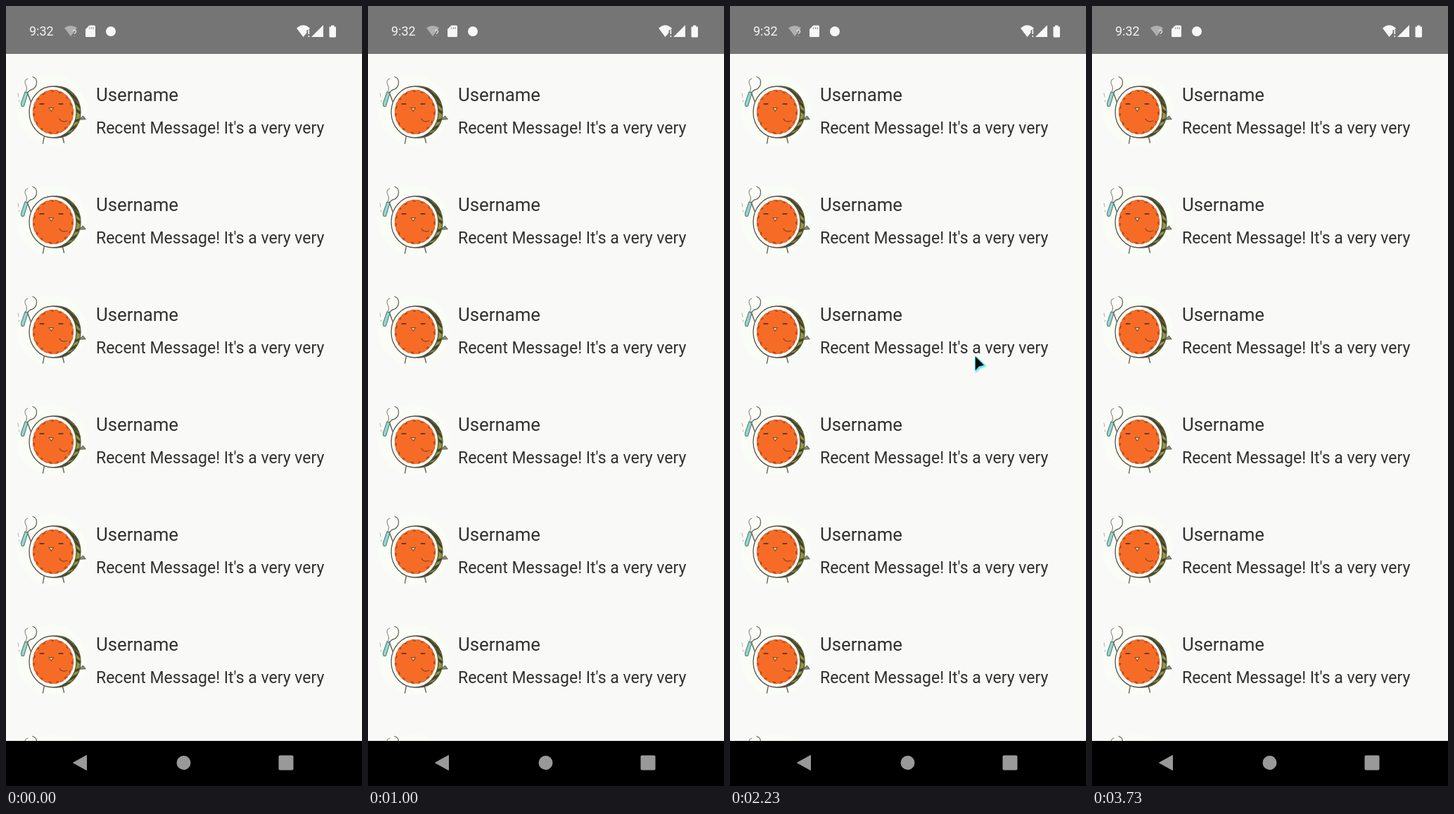
An HTML page that plays this animation: 506x1107 px, repeating every 3.76 s.

```html
<!DOCTYPE html>
<html lang="en">
<head>
<meta charset="utf-8">
<title>Message list</title>
<style>
  html, body { margin: 0; width: 100%; height: 100%; overflow: hidden; background: #f9faf8; }
  svg { display: block; width: 506px; height: 1107px; }
  text { font-family: Roboto, sans-serif; font-weight: 400; fill: #303030; }
  .name { font-size: 25.8px; }
  .msg { font-size: 23px; }
  .clock { font-size: 18px; fill: #f4f4f4; }
</style>
</head>
<body>
<svg viewBox="0 0 506 1107">
  <defs>
    <filter id="glow" x="-50%" y="-50%" width="200%" height="200%">
      <feGaussianBlur stdDeviation="1.3"/>
    </filter>
    <clipPath id="rind"><ellipse cx="72" cy="150.500" rx="34" ry="36.500"/></clipPath>
    <g id="melon" fill="none" stroke="#56554a" stroke-width="1.3" stroke-linecap="round" stroke-linejoin="round">
      <circle cx="65" cy="148" r="50" fill="#f9fdf5" stroke="none"/>
      <!-- limbs -->
      <path d="M54.5 184L52.5 195M80 184L82.5 194M36 138L30 122"/>
      <path d="M104 161L109.500 156L113 160.500Z" fill="#8a8975" stroke-width="1"/>
      <!-- spoon -->
      <path d="M28 110C27 102 33 99 39 100C46 103 45 115 38 118C34 119 32 117 30 121" fill="#fbfcf8" stroke="none"/>
      <path d="M38 100.500C46 103 45 115 37 118.500Q33 119 31 123" stroke="#6c6b61"/>
      <path d="M28 112Q25 105 31 103M28 112Q31 116 28 122" stroke="#8a8a80" stroke-width="1.100"/>
      <path d="M27 122L31 124L25.500 142Q21 144 21.500 138Z" fill="#93d8d2" stroke="#5f7f78" stroke-width="1.100"/>
      <path d="M17 124L18 129M18.500 134V136" stroke="#b0b0a4" stroke-width="1"/>
      <!-- rind -->
      <g clip-path="url(#rind)">
        <rect x="60" y="110" width="48" height="80" fill="#8f9838" stroke="none"/>
        <path d="M82 116L104 136M90 128L108 146M94 144L109 154M96 164L109 160M90 176L106 167M78 185L98 179" stroke="#44441f" stroke-width="3.600"/>
      </g>
      <ellipse cx="72" cy="150.500" rx="34" ry="36.500"/>
      <!-- flesh -->
      <ellipse cx="66.500" cy="150.500" rx="33.500" ry="36.500" fill="#fdfdfa"/>
      <ellipse cx="67" cy="150.500" rx="29" ry="31.500" fill="#f66c27" stroke="none"/>
      <ellipse cx="67" cy="150.500" rx="27" ry="29.500" stroke="#a24a1d" stroke-width="1.700" stroke-dasharray="3 10.500 2 8"/>
      <ellipse cx="67" cy="150.500" rx="28.700" ry="31.200" stroke="#c95a22" stroke-width="1" stroke-dasharray="4 4"/>
      <!-- face -->
      <path d="M48.500 139H53.500M75.500 139H80.500" stroke="#6e3a1e" stroke-width="2.200"/>
      <path d="M61 144.500H67.500L64.300 149.500Z" fill="#f5d59a" stroke="#7d4a2a" stroke-width="1.100"/>
      <path d="M76 160Q79 166 87 163" stroke="#8a4522"/>
    </g>
  </defs>

  <rect width="506" height="1107" fill="#f9faf8"/>
  <g id="list"></g>

  <!-- status bar -->
  <rect width="506" height="68" fill="#757575"/>
  <text class="clock" x="33" y="42">9:32</text>
  <g fill="#f7f7f7">
    <path d="M83 31Q92 25 101 31L92 43Z" opacity=".45"/>
    <path d="M94.500 35.500Q98 32.500 99.500 35.500Q100 37.500 97 39.500M97 42.500V43" fill="none" stroke="#dcdcdc" stroke-width="1.400"/>
    <path d="M118.500 27.500H125.500Q127 27.500 127 29V42.500Q127 44 125.500 44H114.500Q113 44 113 42.500V33Z"/>
    <path d="M118.800 30V33M121.600 30V33M124.400 30V33" stroke="#a0a0a0" stroke-width="1.200"/>
    <circle cx="149" cy="36" r="7"/>
    <path d="M413 31.500Q422.500 23 432 31.500L430 34H427.500V38L422.500 44Z"/>
    <path d="M430.300 34V40M430.300 42V44" stroke="#f7f7f7" stroke-width="1.700"/>
    <path d="M451 27V44H434Z"/>
    <path d="M462 27.500H466.500V29.500H469V43Q469 44.500 467.500 44.500H461Q459.500 44.500 459.500 43V29.500H462Z"/>
  </g>

  <!-- navigation bar -->
  <rect y="1043" width="506" height="64" fill="#000"/>
  <g fill="#999">
    <path d="M95.500 1074L114.500 1063.500V1084.500Z" stroke="#999" stroke-linejoin="round"/>
    <circle cx="252.500" cy="1074" r="10"/>
    <rect x="387.500" y="1063.500" width="21" height="21" rx="2"/>
  </g>

  <g id="cursor">
    <path d="M3 6V25L8 19.500L16 17Z" fill="#2fd3d8" stroke="#2fd3d8" stroke-width="2" opacity=".65" filter="url(#glow)"/>
    <path d="M2 4V22.500L6.500 17.500L13.500 15.500Z" fill="#0a0a0a" stroke="#27c4ca" stroke-width="2" stroke-linejoin="round" paint-order="stroke"/>
  </g>
</svg>
<script>
  const LOOP = 3760, ROWS = 7, PITCH = 156, GROWTH = 58, OPEN_ROW = 2, LINE = 27.5;
  const OPEN_AT = 1030, CLOSE_AT = 2200, LEAVE_AT = 2767;
  const very = n => Array(n).fill("very").join(" ");
  const LINES = ["Recent Message! It's a " + very(2), very(7), very(6) + " long", "message!"];

  const NS = "http://www.w3.org/2000/svg";
  function add(parent, tag, attrs = {}, content = "") {
    const el = document.createElementNS(NS, tag);
    for (const key in attrs) el.setAttribute(key, attrs[key]);
    el.textContent = content;
    return parent.appendChild(el);
  }
  const move = (el, x, y) => el.setAttribute("transform", `translate(${x} ${y})`);
  const show = (el, on) => el.setAttribute("visibility", on ? "visible" : "hidden");

  const list = document.getElementById("list");
  const cursor = document.getElementById("cursor");

  const rows = Array.from({ length: ROWS }, (_, i) => {
    const row = add(list, "g");
    const avatar = add(row, "use", { href: "#melon" });
    const column = add(row, "g");
    add(column, "text", { class: "name", x: 128, y: 134.5 }, "Username");
    const lines = LINES.slice(0, i === OPEN_ROW ? 4 : 1).map((line, k) =>
      add(column, "text", { class: "msg", x: 128, y: 180.5 + k * LINE }, line));
    return { row, avatar, column, extra: lines.slice(1) };
  });

  function layout(open) {
    rows.forEach(({ row, avatar, column, extra }, i) => {
      const grown = open && i === OPEN_ROW;
      move(row, 0, i * PITCH + (open && i > OPEN_ROW ? GROWTH : 0));
      move(avatar, 0, grown ? GROWTH / 2 : 0);
      move(column, 0, grown ? -13 : 0);
      extra.forEach(line => show(line, grown));
    });
  }

  function render(ms) {
    const t = Math.floor((ms + 3.4) * 0.03) / 0.03;
    layout(ms >= OPEN_AT && ms < CLOSE_AT);
    const pull = (Math.max(0, t - LEAVE_AT) / 100) ** 2;
    const x = 347 + 19 * pull, y = 494 + 8 * pull;
    move(cursor, x, y);
    show(cursor, ms >= OPEN_AT && x < 506);
  }

  const start = performance.now();
  function tick() {
    render((performance.now() - start) % LOOP);
    requestAnimationFrame(tick);
  }
  tick();
</script>
</body>
</html>
```
